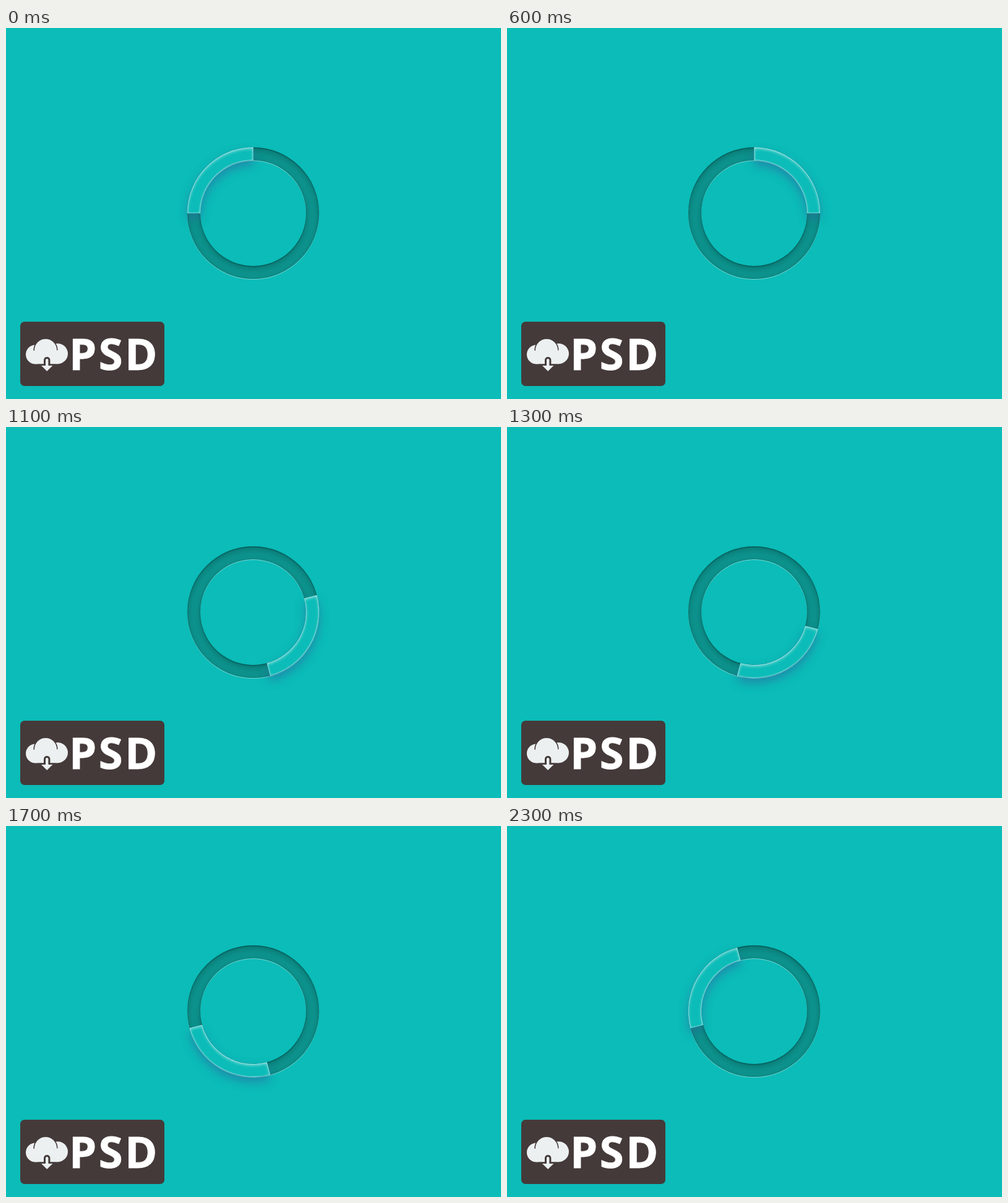
Animation of 800x600 px, one loop 2.4 s. Source, as an HTML page with a canvas:

```html
<!DOCTYPE html>
<html lang="en">
<head>
<meta charset="utf-8">
<title>Loader</title>
<style>
html, body { margin: 0; width: 100%; height: 100%; overflow: hidden; background: #0bbcb8; }
canvas { display: block; }
</style>
</head>
<body>
<canvas id="stage" width="800" height="600"></canvas>
<script>
const ctx = document.getElementById('stage').getContext('2d');
const TEAL = '#0bbcb8', BADGE = '#443a39', CLOUD = '#ecf0f1';
const CX = 399.5, CY = 299.5, OUTER = 106.5, INNER = 85.5;
const STEP = 100, STEPS = 24, TAU = Math.PI * 2, FAR = 2000;

function band(from, to) {
  const p = new Path2D();
  p.arc(CX, CY, OUTER, from, to);
  if (to - from >= TAU) p.moveTo(CX + INNER, CY);
  p.arc(CX, CY, INNER, to, from, true);
  p.closePath();
  return p;
}

const ring = band(0, TAU);

function setShadow(color, x, y, blur) {
  ctx.shadowColor = color;
  ctx.shadowOffsetX = x;
  ctx.shadowOffsetY = y;
  ctx.shadowBlur = blur;
}

// Shadow cast inwards from the edges of a shape
function innerShadow(shape, color, y, blur) {
  const hole = new Path2D();
  hole.rect(200, 100, 400, 400);
  hole.addPath(shape);
  ctx.save();
  ctx.clip(shape);
  setShadow(color, FAR, y, blur);
  ctx.translate(-FAR, 0);
  ctx.fillStyle = '#000';
  ctx.fill(hole, 'evenodd');
  ctx.restore();
}

function innerStroke(shape, color, width) {
  ctx.save();
  ctx.clip(shape);
  ctx.strokeStyle = color;
  ctx.lineWidth = width * 2;
  ctx.stroke(shape);
  ctx.restore();
}

function drawGroove() {
  ctx.save();
  ctx.translate(0, 1);
  ctx.fillStyle = 'rgba(255,255,255,0.45)';
  ctx.fill(ring);
  ctx.restore();
  ctx.fillStyle = '#0d9690';
  ctx.fill(ring);
  innerShadow(ring, 'rgba(0,0,0,0.25)', 4, 14);
  innerShadow(ring, 'rgba(0,50,48,0.6)', 1, 2);
}

function drawSegment(step) {
  const start = Math.PI + step * TAU / STEPS;
  const seg = band(start, start + TAU / 4);
  ctx.save();
  setShadow('rgba(48,90,155,0.5)', 0, 8, 15);
  ctx.fillStyle = TEAL;
  ctx.fill(seg);
  ctx.restore();
  innerShadow(seg, 'rgba(255,255,255,0.5)', 2, 5);
  innerStroke(seg, 'rgba(255,255,255,0.36)', 1);
}

function disc(x, y, r) {
  ctx.beginPath();
  ctx.arc(x, y, r, 0, TAU);
  ctx.fill();
}

function poly(...pts) {
  ctx.beginPath();
  for (let i = 0; i < pts.length; i += 2) ctx.lineTo(pts[i], pts[i + 1]);
  ctx.closePath();
  ctx.fill();
}

function drawCloud() {
  ctx.fillStyle = CLOUD;
  disc(47.5, 528, 15.5);
  disc(83.5, 526.7, 16.5);
  ctx.strokeStyle = BADGE;
  ctx.lineWidth = 2;
  for (const [from, to] of [[3.1, 3.9], [5.5, 6.3]]) {
    ctx.beginPath();
    ctx.arc(64, 521, 18.6, from, to);
    ctx.stroke();
  }
  disc(64, 521, 18);
  ctx.fillRect(47, 522, 37, 21.3);

  // Arrow with a dark surround
  ctx.fillStyle = BADGE;
  ctx.beginPath();
  ctx.roundRect(61, 532, 10.4, 14, [5, 5, 0, 0]);
  ctx.fill();
  ctx.fillStyle = CLOUD;
  ctx.beginPath();
  ctx.roundRect(64, 535, 4.4, 12, [2, 2, 0, 0]);
  ctx.fill();
  poly(57, 546, 75.4, 546, 66.2, 555);
}

function drawBadge() {
  ctx.fillStyle = BADGE;
  ctx.beginPath();
  ctx.roundRect(23, 475, 233, 104, 7);
  ctx.fill();
  drawCloud();
  ctx.fillStyle = ctx.strokeStyle = '#fff';
  ctx.font = 'bold 70.5px "Open Sans", "Noto Sans", sans-serif';
  ctx.letterSpacing = '3.6px';
  ctx.lineWidth = 0.9;
  ctx.fillText('PSD', 101.9, 552.6);
  ctx.strokeText('PSD', 101.9, 552.6);
}

function draw() {
  const step = Math.floor(performance.now() / STEP) % STEPS;
  ctx.fillStyle = TEAL;
  ctx.fillRect(0, 0, 800, 600);
  drawGroove();
  drawSegment(step);
  drawBadge();
  requestAnimationFrame(draw);
}
draw();
</script>
</body>
</html>
```
